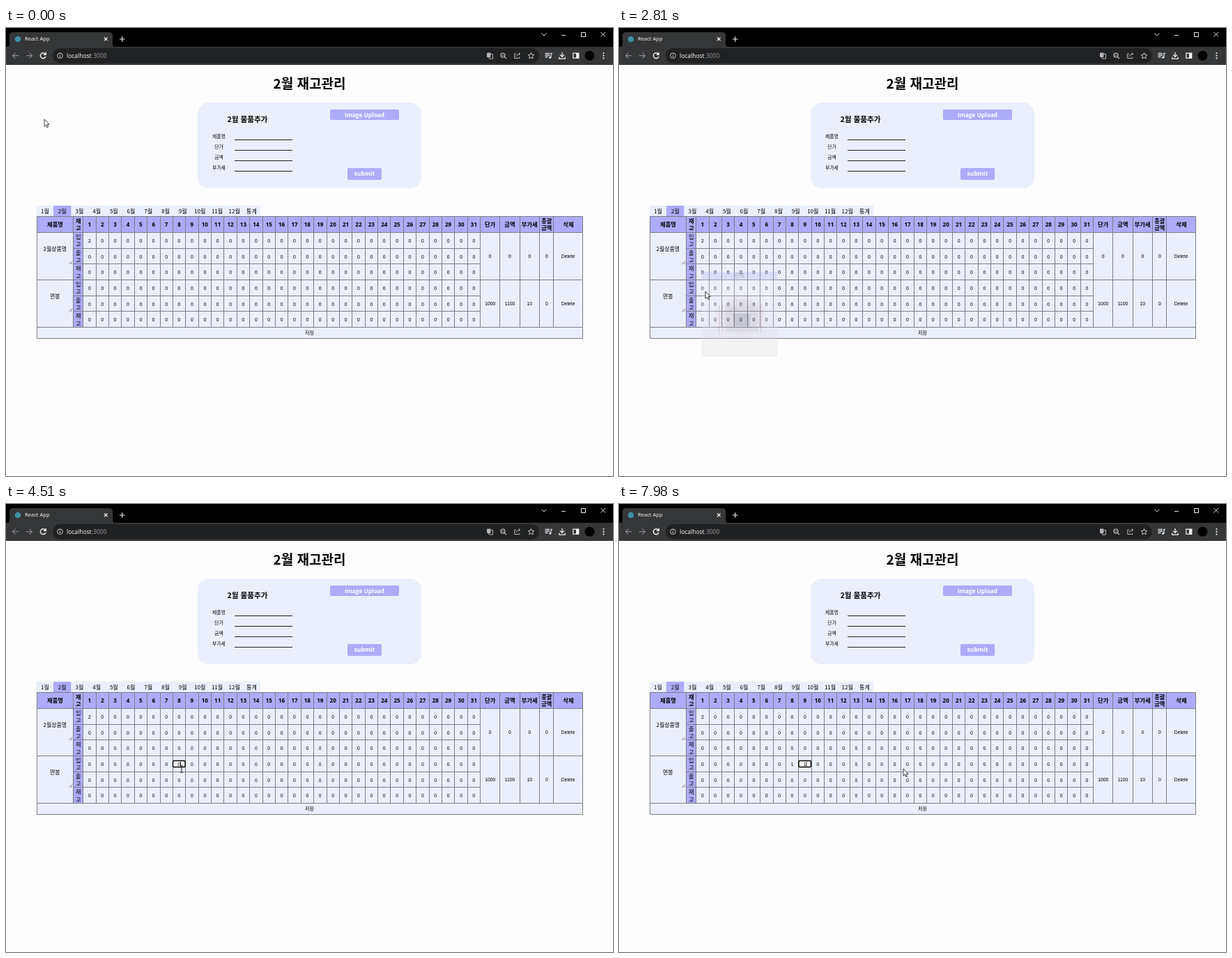
Recreate the animation shown at these times as an HTML page. Size 871 by 643 pixels, loop 8 s.

```html
<!DOCTYPE html>
<html lang="ko">
<head>
<meta charset="utf-8">
<title>React App</title>
<style>
html, body { margin: 0; width: 100%; height: 100%; overflow: hidden; background: #fdfdfd; }
svg { display: block; width: 871px; height: 643px; }
text { font-family: 'Noto Sans CJK KR', 'Noto Sans CJK', sans-serif; font-weight: 500; white-space: pre; }
.ui { font-family: 'Open Sans', 'Noto Sans', sans-serif; font-weight: 400; }
.num { font-family: 'Liberation Sans', Arial, sans-serif; font-weight: 400; }
.bold { font-weight: 700; }
</style>
</head>
<body>
<svg id="stage" viewBox="0 0 871 643" xmlns="http://www.w3.org/2000/svg"></svg>
<script>
const LOOP = 8000;
const PURPLE = '#aeabf9', PALE = '#ebeffc', GRID = '#7d7d86';

const rect = (x, y, w, h, fill, extra = '') =>
  `<rect x="${x}" y="${y}" width="${w}" height="${h}" fill="${fill}" ${extra}/>`;
const path = (d, color, width = 1, extra = '') =>
  `<path d="${d}" fill="none" stroke="${color}" stroke-width="${width}" ${extra}/>`;
// y is the vertical middle of the line
const text = (x, y, s, size, o = {}) =>
  `<text x="${x}" y="${y + size * 0.36}" font-size="${size}" class="${o.cls || ''} ${o.bold ? 'bold' : ''}"` +
  ` fill="${o.fill || '#000'}" text-anchor="${o.anchor || 'middle'}" ${o.id ? `id="${o.id}"` : ''}>${s}</text>`;

function chrome() {
  const ink = '#dedfe1', dim = '#85878a';
  return rect(0, 0, 871, 28, '#000') + rect(0, 27, 871, 26, '#353637') +
    '<path d="M2 27Q5 27 5 23V11Q5 6 10 6H148Q153 6 153 11V23Q153 27 156 27Z" fill="#353637"/>' +
    '<circle cx="17" cy="16" r="4.3" fill="#3f8fa3"/>' +
    text(27, 15.7, 'React App', 7.6, { cls: 'ui', fill: '#fff', anchor: 'start' }) +
    path('M141 13.5l4.5 4.5m0-4.5l-4.5 4.5M163 16h7.5M166.7 12.2v7.6', '#eee', 1.2) +
    path('M768.5 7.5l3.5 3.5 3.5-3.5M797 10.5h6M853.5 6l6.5 6.5m0-6.5l-6.5 6.5', '#ddd', 1) +
    path('M825.5 6.5h6v6h-6z', '#eee', 1) +
    path('M18 39.7H9.5m4-4l-4 4 4 4M29 39.7h8.5m-4-4l4 4-4 4', dim, 1.2) +
    path('M56.3 37.2A3.9 3.9 0 1 0 57 40.8M57.2 35v3.2h-3.3', '#f2f2f2', 1.4) +
    rect(67, 29, 698, 21.5, '#202122', 'rx="10.7"') +
    '<circle cx="77.5" cy="39.7" r="3.8" fill="none" stroke="#ccc"/>' +
    path('M77.5 39v3M77.5 37v1', '#ccc', 1) +
    `<text x="87" y="42.8" font-size="8.5" class="ui" fill="#fff">localhost<tspan fill="#9a9c9f">:3000</tspan></text>` +
    rect(690, 35.5, 5.5, 6.5, '#b5b6b8', 'rx="1"') + path('M695.5 37.5h3v6.5h-5l-1-2', '#b5b6b8', 1) +
    '<circle cx="713" cy="39" r="3" fill="none" stroke="#ccc" stroke-width="1.1"/>' +
    path('M715.3 41.3l2.7 2.7M711.5 39h3', '#ccc', 1.1) +
    path('M732 37h-2.2v6.5h7v-2M732.5 41q.4-3.8 5-3.8m-2-2l2.3 2-2.3 2', '#bbb', 1) +
    path('M753.5 35.5l1.3 2.8 3 .3-2.2 2.1.6 3-2.7-1.5-2.7 1.5.6-3-2.2-2.1 3-.3z', '#ccc', 1) +
    path('M773.5 36.5h6.5M773.5 39h6.5M773.5 41.5h4M782 36v6M781.5 36.5h2.5', ink, 1.3) +
    '<circle cx="780.7" cy="42.2" r="1.5" fill="#dedfe1"/>' +
    path('M798 35v6m-3-2.6l3 3 3-3M793.8 41.5v2.7h8.4v-2.7', '#f2f2f2', 1.3) +
    path('M813.8 36.2h8v7h-8z', '#f2f2f2', 1.2) + rect(818, 36, 4, 7.5, '#f2f2f2') +
    '<circle cx="837.5" cy="39.7" r="7" fill="#000"/>' +
    [36, 39.7, 43.4].map(y => `<circle cx="857.5" cy="${y}" r="1.1" fill="#eee"/>`).join('');
}

function form() {
  const fields = ['제품명', '단가', '금액', '부가세'].map((s, i) =>
    text(305.5, 155.3 + 15.1 * i, s, 6.8) +
    rect(328, Math.round(159.6 + 15.2 * i), 83, 1, '#222')).join('');
  const white = { cls: 'ui', fill: '#fff', bold: true };
  return text(435.5, 80.5, '2월 재고관리', 19, { bold: true }) +
    rect(275, 107, 321, 123, PALE, 'rx="16"') +
    text(346.5, 131.5, '2월 물품추가', 10.6, { bold: true }) + fields +
    rect(465, 117, 99, 15, PURPLE, 'rx="2"') + text(514.5, 124.7, 'Image Upload', 8.3, white) +
    rect(490, 201, 49, 17, PURPLE, 'rx="2"') + text(514.5, 209.3, 'submit', 8.5, white);
}

const DAY0 = 110.2, DAYW = 570 / 31, ROW0 = 293, ROWH = 136 / 6;
const dayX = i => DAY0 + DAYW * (i + 0.5) + 0.4;
const rowY = r => ROW0 + ROWH * (r + 0.5) + 0.8;
const snap = v => Math.round(v) + 0.5;
const stack = (x, y, s, bold) =>
  text(x, y - 5, s.slice(0, s.length / 2), 8.2, { bold }) + text(x, y + 5.2, s.slice(s.length / 2), 8.2, { bold });

function monthTabs() {
  let out = rect(44, 255, 321, 15, PALE) + rect(68, 255, 25.3, 15, PURPLE);
  for (let i = 0; i < 13; i++)
    out += text(56 + 24.7 * i, 263, i < 12 ? i + 1 + '월' : '통계', 8);
  return out;
}

function table() {
  let out = rect(44, 270, 784, 176, PALE) + rect(44, 270, 784, 23, PURPLE) +
    rect(97, 293, 13.5, 136, PURPLE);
  const head = (x, s) => text(x, 282, s, 8.3, { bold: true });
  out += head(70.5, '제품명') + stack(103.7, 282, '재고', true) + head(694.7, '단가') +
    head(723, '금액') + head(751.3, '부가세') + stack(775.8, 282, '총괄금액', true) + head(807, '삭제');

  for (let i = 0; i < 31; i++) {
    out += text(dayX(i), 282, i + 1, 8, { cls: 'ui', bold: true });
    for (let r = 0; r < 6; r++) {
      const id = r === 3 && (i === 7 || i === 8) ? 'day' + (i + 1) : '';
      out += text(dayX(i), rowY(r) + 0.5, r + i ? 0 : 2, 6.8, { cls: 'num', id });
    }
  }
  ['입고', '출고', '재고', '입고', '출고', '재고'].forEach((s, r) => { out += stack(103.7, rowY(r), s); });

  [['2월상품명', 0, 0, 0], ['면봉', 1000, 1100, 10]].forEach(([name, ...sums], g) => {
    const y = 327.5 + 68 * g;
    out += text(70.3, y - 10, name, 7.9);
    out += path(`M90.5 ${y + 11.5}l4.5-4.5M93 ${y + 11.5}l2-2`, '#555', 0.7);
    [...sums, 0, 'Delete'].forEach((s, i) => {
      out += text([694.7, 723, 751.3, 775.8, 806.7][i], y, s, 6.8, { cls: 'num' });
    });
  });

  let d = 'M44.5 270.5H827.5V445.5H44.5Z';
  for (let r = 0; r < 7; r++) {
    const [from, to] = r % 3 ? [97, 681] : [44, 828];
    d += `M${from} ${snap(ROW0 + ROWH * r)}H${to}`;
  }
  for (let i = 0; i < 32; i++) d += `M${snap(DAY0 + DAYW * i)} 270V429`;
  [96, 708, 737, 765, 785].forEach(x => { d += `M${snap(x)} 270V429`; });
  return out + path(d, GRID, 1) + text(435.5, 437.5, '저장', 7);
}

function preview() {
  let bars = '';
  for (let x = 143; x < 208; x += 5)
    bars += rect(x, 398 - 8 * Math.sin((x - 143) / 65 * Math.PI), 1.5, 42, '#b08474');
  return '<defs><linearGradient id="paper" x2="0" y2="1"><stop offset=".3" stop-color="#f4f2f3"/>' +
    '<stop offset="1" stop-color="#cfcfd2"/></linearGradient>' +
    '<radialGradient id="shade"><stop offset=".4" stop-color="#b9a8a4"/>' +
    '<stop offset="1" stop-color="#e2d8d5" stop-opacity="0"/></radialGradient></defs>' +
    '<g id="preview">' + rect(118.5, 350, 108.5, 122, 'url(#paper)') +
    rect(118.5, 350, 108.5, 11, PURPLE) + text(173, 355.5, '면봉', 8) +
    rect(130, 376, 90, 78, 'url(#shade)') + bars +
    rect(153, 400, 46, 36, '#a59b9c', 'rx="4" opacity=".7"') + rect(164, 410, 24, 18, '#4f4e57') + '</g>';
}

const overlay =
  '<g id="focus">' + rect(-9, -4.6, 17.6, 9, '#fff', 'rx="1.5" stroke="#000" stroke-width="1.5"') +
  '<rect id="mark" x="-2.3" y="-3.5" width="4.4" height="7" fill="#2f6fd0"/>' +
  text(-0.3, 0.1, '0', 6.8, { cls: 'num', id: 'typed' }) +
  '<rect id="caret" x="1.7" y="-3.3" width=".9" height="6.6" fill="#000"/></g>' + preview() +
  '<path id="arrow" d="M0 0V10.3L2.4 8.1 4 11.7 5.6 11 4.1 7.5H7.2Z" fill="#fff" stroke="#111" stroke-width=".8"/>' +
  '<path id="beam" d="M-2-5H-.5L0-4.5 .5-5H2M0-4.5V4.5M-2 5H-.5L0 4.5 .5 5H2" fill="none" stroke="#111" stroke-width=".9"/>';

const stage = document.getElementById('stage');
stage.innerHTML = rect(0, 0, 871, 643, '#fdfdfd') + chrome() + form() + monthTabs() + table() + overlay;
const $ = id => document.getElementById(id);
const show = (id, on) => $(id).setAttribute('visibility', on ? 'inherit' : 'hidden');
const put = (id, x, y) => $(id).setAttribute('transform', `translate(${x.toFixed(2)} ${y.toFixed(2)})`);

// time, x, y of the pointer
const moves = [
  [0, 55, 131], [250, 55, 131], [950, 401, 80], [1450, 401, 80], [2250, 76, 385],
  [2580, 78, 384], [2810, 124, 378], [3000, 130, 378], [3310, 110, 382], [3480, 82, 384],
  [3750, 84, 384], [4250, 252, 380], [4950, 252, 381], [5550, 408, 380], [LOOP, 408, 380]
];

function pointer(t) {
  const k = moves.findIndex(m => m[0] > t);
  const [a, b] = [moves[k - 1], moves[k]];
  const u = (t - a[0]) / (b[0] - a[0]), e = u * u * (3 - 2 * u);
  return [a[1] + (b[1] - a[1]) * e, a[2] + (b[2] - a[2]) * e];
}

const ramp = (t, from, span) => Math.min(1, Math.max(0, (t - from) / span));

function draw(t) {
  const [x, y] = pointer(t);
  const beam = (x > 384 && x < 487 && y > 70 && y < 92) ||
    (x > 46 && x < 95 && y > 364 && y < 406) || (t > 4150 && t < 5020);
  show('beam', beam);
  show('arrow', !beam);
  put('beam', x, y);
  put('arrow', x, y);

  const fade = ramp(t, 2200, 200) - ramp(t, 2660, 200) + ramp(t, 3420, 200) - ramp(t, 3850, 200);
  $('preview').setAttribute('opacity', fade.toFixed(3));

  const focused = t >= 4300, second = t >= 7000;
  show('focus', focused);
  put('focus', dayX(second ? 8 : 7), rowY(3) - 0.1);
  const value = second ? (t < 7600 ? '0' : '1') : t < 5700 ? '0' : t < 6500 ? '' : '1';
  const selected = second && t < 7600;
  $('typed').textContent = value;
  $('typed').setAttribute('fill', selected ? '#fff' : '#000');
  show('mark', focused && selected);
  const since = t - [4300, 5700, 6500, 7600].filter(s => s <= t).pop();
  show('caret', focused && !selected && value !== '' && Math.floor(since / 500) % 2 === 0);
  $('day8').textContent = second ? '1' : '0';
  show('day8', !focused || second);
  show('day9', !second);
}

const start = performance.now();
function tick() {
  draw((performance.now() - start) % LOOP);
  requestAnimationFrame(tick);
}
tick();
</script>
</body>
</html>
```
